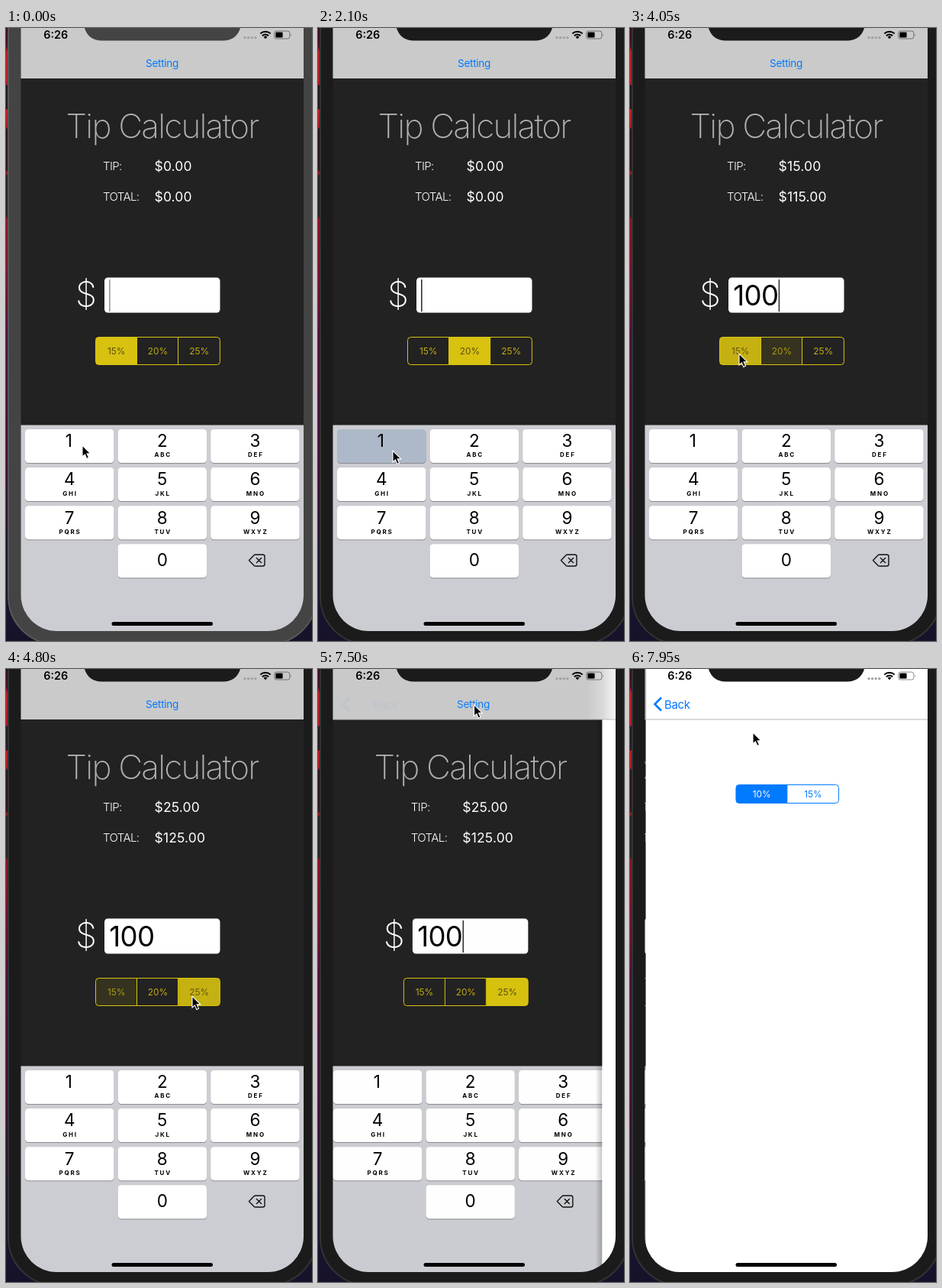
Write an HTML page that moves like this. It is 401 by 802 pixels and loops after 8000 ms.

```html
<!DOCTYPE html>
<html lang="en">
<head>
<meta charset="utf-8">
<title>Tip Calculator</title>
<style>
  html, body { margin: 0; width: 100%; height: 100%; overflow: hidden; background: #111; }
  svg { display: block; width: 401px; height: 802px; font-family: Inter, "Liberation Sans", sans-serif; }
  text { white-space: pre; }
  .mid { text-anchor: middle; }
  .bezel { fill: #1b1b1b; stroke: #343434; }
  .notch { fill: #1b1b1b; }
  .idle .bezel { fill: #444; stroke: #585858; }
  .idle .notch { fill: #444; }
  .thin { font-weight: 200; }
  .light { font-weight: 300; fill: #fff; font-size: 15px; letter-spacing: -.6px; }
  .sum { fill: #fff; font-size: 17.5px; letter-spacing: .15px; }
  .digit { font-size: 22.5px; }
  .abc { font-size: 8px; font-weight: 700; letter-spacing: 1.8px; }
  .link { fill: #007aff; }
</style>
</head>
<body>
<svg id="stage" viewBox="0 0 401 802">
  <defs>
    <linearGradient id="wall" x1="0" y1="0" x2="0" y2="802" gradientUnits="userSpaceOnUse">
      <stop offset="0" stop-color="#2a0d25"/>
      <stop offset=".03" stop-color="#4a1024"/>
      <stop offset=".04" stop-color="#c01f28"/>
      <stop offset=".092" stop-color="#b01d28"/>
      <stop offset=".094" stop-color="#22181d"/>
      <stop offset=".132" stop-color="#22181d"/>
      <stop offset=".134" stop-color="#c81f28"/>
      <stop offset=".162" stop-color="#a51b28"/>
      <stop offset=".165" stop-color="#24161c"/>
      <stop offset=".232" stop-color="#24161c"/>
      <stop offset=".236" stop-color="#b01c26"/>
      <stop offset=".241" stop-color="#262223"/>
      <stop offset=".307" stop-color="#262223"/>
      <stop offset=".312" stop-color="#8f1427"/>
      <stop offset=".41" stop-color="#75102c"/>
      <stop offset=".5" stop-color="#4b0d36"/>
      <stop offset=".7" stop-color="#3f0b33"/>
      <stop offset=".85" stop-color="#1c1233"/>
      <stop offset="1" stop-color="#17122a"/>
    </linearGradient>
    <linearGradient id="shade"><stop stop-opacity="0"/><stop offset="1" stop-opacity=".22"/></linearGradient>
    <linearGradient id="blend">
      <stop stop-color="#fff" stop-opacity="0"/>
      <stop offset=".4" stop-color="#fff" stop-opacity=".3"/>
      <stop offset=".6" stop-color="#fff" stop-opacity=".65"/>
      <stop offset="1" stop-color="#fff"/>
    </linearGradient>
    <clipPath id="screen"><rect x="19.5" y="-60" width="370.5" height="849" rx="47"/></clipPath>
  </defs>

  <rect width="401" height="802" fill="url(#wall)"/>
  <rect class="bezel" x="3" y="-80" width="404" height="886" rx="62" stroke-width="2"/>

  <g clip-path="url(#screen)">
    <g id="main">
      <rect x="19" width="371" height="802" fill="#222"/>
      <text class="mid thin" x="204.5" y="144" font-size="44" letter-spacing="-1.8" fill="#b0b0b0">Tip Calculator</text>
      <text class="light" x="127" y="186">TIP:</text>
      <text class="light" x="127" y="226">TOTAL:</text>
      <text class="sum" id="tip" x="194.5" y="187"></text>
      <text class="sum" id="total" x="194.5" y="227"></text>
      <text class="mid thin" x="105" y="363.5" font-size="45" fill="#fff">$</text>
      <rect x="129" y="326.5" width="151.5" height="46" rx="4.5" fill="#fff"/>
      <text id="amount" x="135.3" y="362.5" font-size="36.5" letter-spacing="-.6"></text>
      <rect id="caret" y="329" width="1.6" height="42" fill="#333"/>
      <g id="rates"></g>
      <g id="pad"><rect x="19" y="519.5" width="371" height="283" fill="#cccdd2"/></g>
    </g>
    <rect id="dim" x="19" width="371" height="802"/>

    <g id="page">
      <rect id="edge" x="10.5" y="66" width="9" height="736" fill="url(#shade)"/>
      <rect x="19.5" width="371" height="802" fill="#fff"/>
      <g id="defaults"></g>
    </g>

    <rect x="19" width="372" height="66" fill="#cacaca"/>
    <g id="navPush">
      <rect id="navDim" x="19" width="372" height="66"/>
      <rect id="navBlend" height="66" fill="url(#blend)"/>
      <rect id="navWhite" width="420" height="66" fill="#fff"/>
      <rect x="19" y="65.5" width="372" height="1" fill="#b6b6b8"/>
    </g>
    <text class="mid link" id="setting" y="51" font-size="13.5" letter-spacing="-.3">Setting</text>
    <g id="back">
      <path d="M41 37.5 L32.5 46 L41 54.5" fill="none" stroke="#007aff" stroke-width="2.6"/>
      <text class="link" id="backText" y="51.7" font-size="15" letter-spacing="-.4">Back</text>
    </g>

    <text x="49.2" y="14.3" font-size="14.4" font-weight="600">6:26</text>
    <g id="dots" fill="#a0a0a0"></g>
    <g fill="none" stroke="#000" stroke-width="2">
      <path d="M333.3 7.4 A9.5 9.5 0 0 1 346.7 7.4"/>
      <path d="M335.9 10.2 A5.8 5.8 0 0 1 344.1 10.2"/>
    </g>
    <path d="M337.6 11.7 A3.5 3.5 0 0 1 342.4 11.7 L340 14.2 Z"/>
    <rect x="351.8" y="4" width="20" height="10" rx="2.6" fill="none" stroke="#000" stroke-opacity=".45"/>
    <rect x="353.3" y="5.5" width="9.3" height="7" rx="1.2"/>
    <path d="M373.3 7.2 q1.6 1.8 0 3.6 z" fill-opacity=".5"/>
    <rect x="138.5" y="777" width="132.5" height="5" rx="2.5"/>
  </g>
  <rect class="notch" x="102.500" y="-40" width="205" height="56.5" rx="21.5"/>
  <path id="cursor" d="M0 0 V15 L3.400 11.900 L5.800 17.400 L8.500 16.200 L6.100 10.900 H10.800 Z" stroke="#fff" stroke-width="1.1"/>
</svg>

<script>
const LOOP = 8000, STEP = 150;
const NS = 'http://www.w3.org/2000/svg';
const $ = id => document.getElementById(id);
const clamp = v => Math.max(0, Math.min(1, v));

function add(parent, tag, attrs, text) {
  const el = document.createElementNS(NS, tag);
  for (const k in attrs) el.setAttribute(k, attrs[k]);
  if (text) el.textContent = text;
  parent.append(el);
  return el;
}

function set(id, attrs) {
  for (const k in attrs) $(id).setAttribute(k, attrs[k]);
}

// Segmented control; returns a function that sets each cell's fill strength.
function segments(id, o) {
  const root = $(id), w = o.cell * o.labels.length;
  const frame = { x: o.x, y: o.y, width: w, height: o.h, rx: 4 };
  add(add(root, 'clipPath', { id: id + 'Clip' }), 'rect', frame);
  const fills = add(root, 'g', { 'clip-path': `url(#${id}Clip)` });
  const cells = o.labels.map((label, i) => {
    const x = o.x + i * o.cell;
    const at = { class: 'mid', x: x + o.cell / 2, y: o.base, 'font-size': o.size };
    const fill = add(fills, 'rect', { x, y: o.y, width: o.cell, height: o.h, fill: o.color });
    if (i) add(root, 'rect', { x: Math.floor(x - .5), y: o.y, width: 1, height: o.h, fill: o.color });
    const off = add(root, 'text', { ...at, fill: o.ink }, label);
    const on = add(root, 'text', { ...at, fill: o.onInk }, label);
    return [fill, off, on];
  });
  add(root, 'rect', { ...frame, fill: 'none', stroke: o.color });
  return levels => cells.forEach(([fill, off, on], i) => {
    fill.setAttribute('opacity', levels[i]);
    on.setAttribute('opacity', levels[i]);
    off.setAttribute('opacity', 1 - levels[i]);
  });
}

const setRates = segments('rates', {
  x: 117.5, y: 404.5, cell: 54.3, h: 36, base: 427, size: 11.8,
  labels: ['15%', '20%', '25%'], color: '#d8c20f', ink: '#c2ac14', onInk: '#585012'
});
segments('defaults', {
  x: 137.8, y: 151.5, cell: 67.3, h: 24, base: 167.8, size: 11.8,
  labels: ['10%', '15%'], color: '#007aff', ink: '#007aff', onInk: '#fff'
})([1, 0]);

const keys = {};
['', 'ABC', 'DEF', 'GHI', 'JKL', 'MNO', 'PQRS', 'TUV', 'WXYZ', null, ''].forEach((abc, i) => {
  if (abc === null) return;
  const x = 25 + i % 3 * 121.6, y = 525 + Math.floor(i / 3) * 50.1, mid = x + 58.2;
  const digit = i === 10 ? '0' : String(i + 1);
  const box = { x, width: 116.4, height: 44, rx: 4.5 };
  add($('pad'), 'rect', { ...box, y: y + 1, fill: '#8b8c90' });
  keys[digit] = add($('pad'), 'rect', { ...box, y, fill: '#fff' });
  add($('pad'), 'text', { class: 'mid digit', x: mid - (i ? 0 : .8), y: y + (i === 10 ? 29 : 23.3) }, digit);
  if (abc) add($('pad'), 'text', { class: 'mid abc', x: mid + .9, y: y + 36.4 }, abc);
});
add($('pad'), 'path', {
  d: 'M318.500 696.500 L325 689.800 Q325.800 689 327 689 H336.500 Q339 689 339 691.500 V701.500 Q339 704 336.500 704 H327 Q325.800 704 325 703.200 Z M328 693 l7 7 m0 -7 l-7 7',
  fill: 'none', stroke: '#111', 'stroke-width': 1.4, 'stroke-linejoin': 'round'
});
for (let i = 0; i < 4; i++) add($('dots'), 'circle', { cx: 313 + i * 4.6, cy: 12.6, r: 1.7 });

// Pointer stops: time, x, y
const path = [
  [0, 100, 546], [600, 200, 424], [900, 205, 426], [1200, 240, 440], [1500, 212, 482],
  [1950, 99, 561], [2100, 98, 553], [2250, 101, 556], [2400, 178, 698], [3150, 179, 700],
  [3750, 141, 425], [4050, 143, 426], [4500, 241, 427], [4800, 244, 428], [5100, 250, 535],
  [5550, 263, 660], [6150, 246, 533], [6450, 228, 468], [7200, 203, 46],
  [7650, 205, 47], [7950, 161, 83]
];
const picks = [[-1000, 0], [600, 1], [3900, 0], [4650, 2]];
const presses = [[2100, 2250, '1'], [2400, 2550, '0'], [2700, 2850, '0']];
const caretX = [135, 152, 173.4, 194.6];
const rates = [.15, .2, .25];

function pointer(t) {
  const i = Math.max(1, path.findIndex(p => p[0] >= t));
  const [t0, x0, y0] = path[i - 1], [t1, x1, y1] = path[i];
  const u = (t - t0) / (t1 - t0), e = u * u * (3 - 2 * u);
  return [x0 + (x1 - x0) * e, y0 + (y1 - y0) * e];
}

function blink(t) {
  const ph = (t + 580) % 1100;
  return ph < 1000 ? clamp((640 - ph) / 120) : (ph - 1000) / 100;
}

// Critically damped push of the settings page
function push(t) {
  const u = Math.max(0, t - 7480) * .017;
  return 1 - (1 + u) * Math.exp(-u);
}

function drawForm(t) {
  const done = picks.filter(p => p[0] <= t);
  const [start, now] = done[done.length - 1];
  const last = done.length > 1 ? done[done.length - 2][1] : now;
  const k = clamp((t - start) / 168);
  setRates(rates.map((_, i) => i === now ? k : i === last ? 1 - k : 0));

  const typed = presses.filter(p => p[1] <= t).map(p => p[2]).join('');
  const tip = typed * rates[now];
  $('amount').textContent = typed;
  $('tip').textContent = '$' + tip.toFixed(2);
  $('total').textContent = '$' + (+typed + tip).toFixed(2);
  set('caret', { x: caretX[typed.length], opacity: blink(t) });

  const held = presses.find(p => t >= p[0] && t < p[1]);
  for (const d in keys) keys[d].setAttribute('fill', held && held[2] === d ? '#adb9c9' : '#fff');
}

function drawPush(t) {
  const p = push(t), gap = 370 * (1 - p), edge = 19.7 + gap;
  const soft = clamp((1 - p) * 4.6);
  const display = p > 0 ? 'inline' : 'none';
  set('main', { transform: `translate(${-111 * p})` });
  set('page', { transform: `translate(${gap})`, display });
  set('navPush', { display });
  set('dim', { opacity: .1 * p });
  set('navDim', { opacity: .1 * p });
  set('edge', { opacity: soft });
  set('navBlend', { x: edge - 20 * soft, width: 52 * soft });
  set('navWhite', { x: edge + 32 * soft });
  const pressed = t >= 7350 && p === 0;
  set('setting', { x: 204.5 - 21.6 * p, opacity: pressed ? .3 : clamp(1 - p * 1.03) });
  set('back', { opacity: clamp(p * 1.25) });
  set('backText', { x: 45 + 28 * (1 - p) });
}

function frame(now) {
  const t = Math.floor(now % LOOP / STEP) * STEP;
  $('stage').classList.toggle('idle', t < 600);
  drawForm(t);
  drawPush(t);
  set('cursor', { transform: `translate(${pointer(t)})` });
  requestAnimationFrame(frame);
}
frame(0);
</script>
</body>
</html>
```
